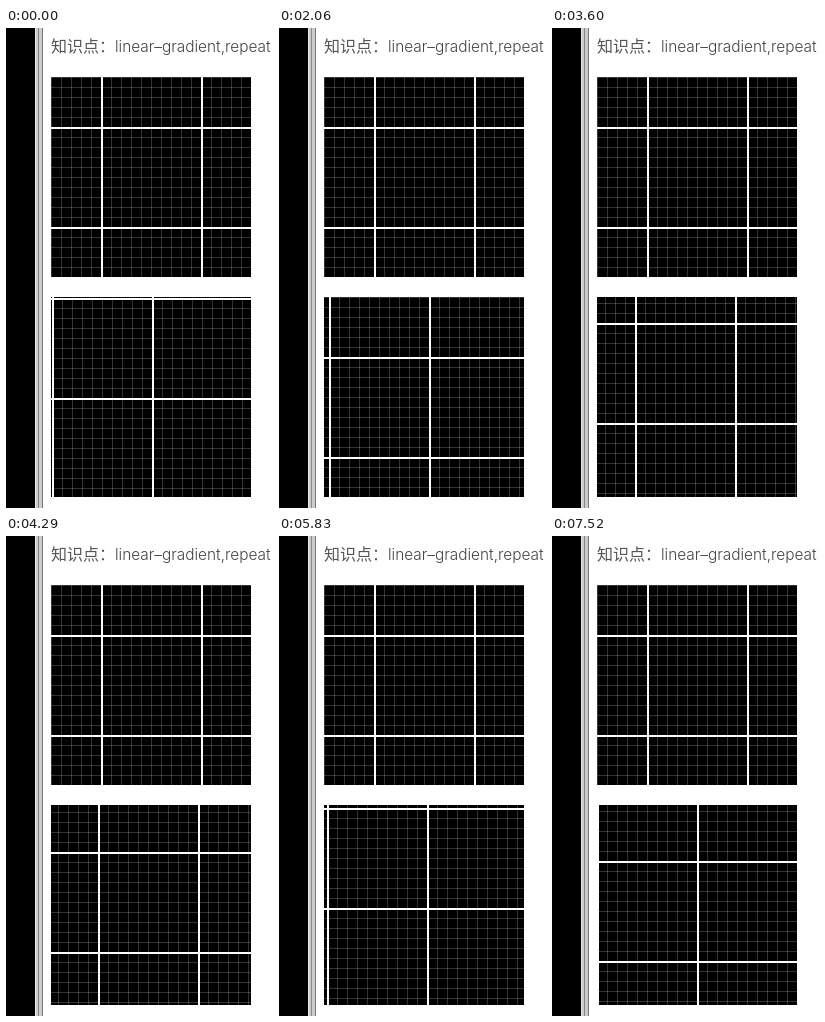
Recreate the animation shown at these times as an HTML page with a canvas. Size 267 by 480 pixels, loop 7590 ms.

```html
<!DOCTYPE html>
<html lang="zh">
<head>
<meta charset="utf-8">
<style>
  html, body { margin: 0; width: 100%; height: 100%; overflow: hidden; background: #fff; }
  canvas, svg { position: absolute; left: 0; top: 0; width: 267px; height: 480px; }
  text { font-weight: 300; }
  .zh { font-family: "Noto Sans CJK SC", "Noto Sans CJK", sans-serif; font-size: 16px; fill: #555; }
  .en { font-family: Inter, sans-serif; font-size: 15.4px; fill: #444; }
</style>
</head>
<body>
<canvas width="267" height="480"></canvas>
<svg viewBox="0 0 267 480">
  <text class="zh" x="45" y="24">知识点：</text>
  <text class="en" x="109" y="24">linear–gradient,repeat</text>
</svg>
<script>
const ctx = document.querySelector('canvas').getContext('2d');
const LOOP = 7590, STEP = 77, LEAD = 30;
const CYCLE = 5920, PHASE = 25;
const SIZE = 200;

// Background offset keyframes: [progress, x, y]
const keys = [[0, 0, 0], [0.3, 0, -50], [0.7, 50, 50], [1, 0, 0]];

const mod = (a, n) => ((a % n) + n) % n;

function offsetAt(t) {
  const p = mod(t - PHASE, CYCLE) / CYCLE;
  const i = keys.findIndex(k => k[0] > p);
  const [p0, x0, y0] = keys[i - 1];
  const [p1, x1, y1] = keys[i];
  const u = (p - p0) / (p1 - p0);
  return [Math.round(x0 + (x1 - x0) * u), Math.round(y0 + (y1 - y0) * u)];
}

function rect(color, x, y, w, h) {
  ctx.fillStyle = color;
  ctx.fillRect(x, y, w, h);
}

function lines(left, top, ox, oy, gap, width, color) {
  for (let x = mod(ox, gap) - gap; x < SIZE; x += gap) rect(color, left + x, top, width, SIZE);
  for (let y = mod(oy, gap) - gap; y < SIZE; y += gap) rect(color, left, top + y, SIZE, width);
}

function grid(left, top, ox, oy) {
  ctx.save();
  ctx.beginPath();
  ctx.rect(left, top, SIZE, SIZE);
  ctx.clip();
  rect('#000', left, top, SIZE, SIZE);
  lines(left, top, ox, oy, 10, 1, 'rgba(255,255,255,0.2)');
  lines(left, top, ox, oy, 100, 2, '#fff');
  ctx.restore();
}

function draw(t) {
  rect('#fff', 0, 0, 267, 480);
  rect('#000', 0, 0, 29, 480);
  rect('#e8e8e8', 29, 0, 1, 480);
  rect('#ccc', 30, 0, 6, 480);
  rect('#888', 32, 0, 1, 480);
  rect('#777', 36, 0, 1, 480);
  grid(45, 49, 50, 50);
  grid(45, 269, ...offsetAt(t));
}

const start = performance.now();
function tick() {
  const t = (performance.now() - start) % LOOP;
  const held = Math.floor((t + LEAD) / STEP) * STEP - LEAD;
  draw(Math.max(0, held));
  requestAnimationFrame(tick);
}
tick();
</script>
</body>
</html>
```
